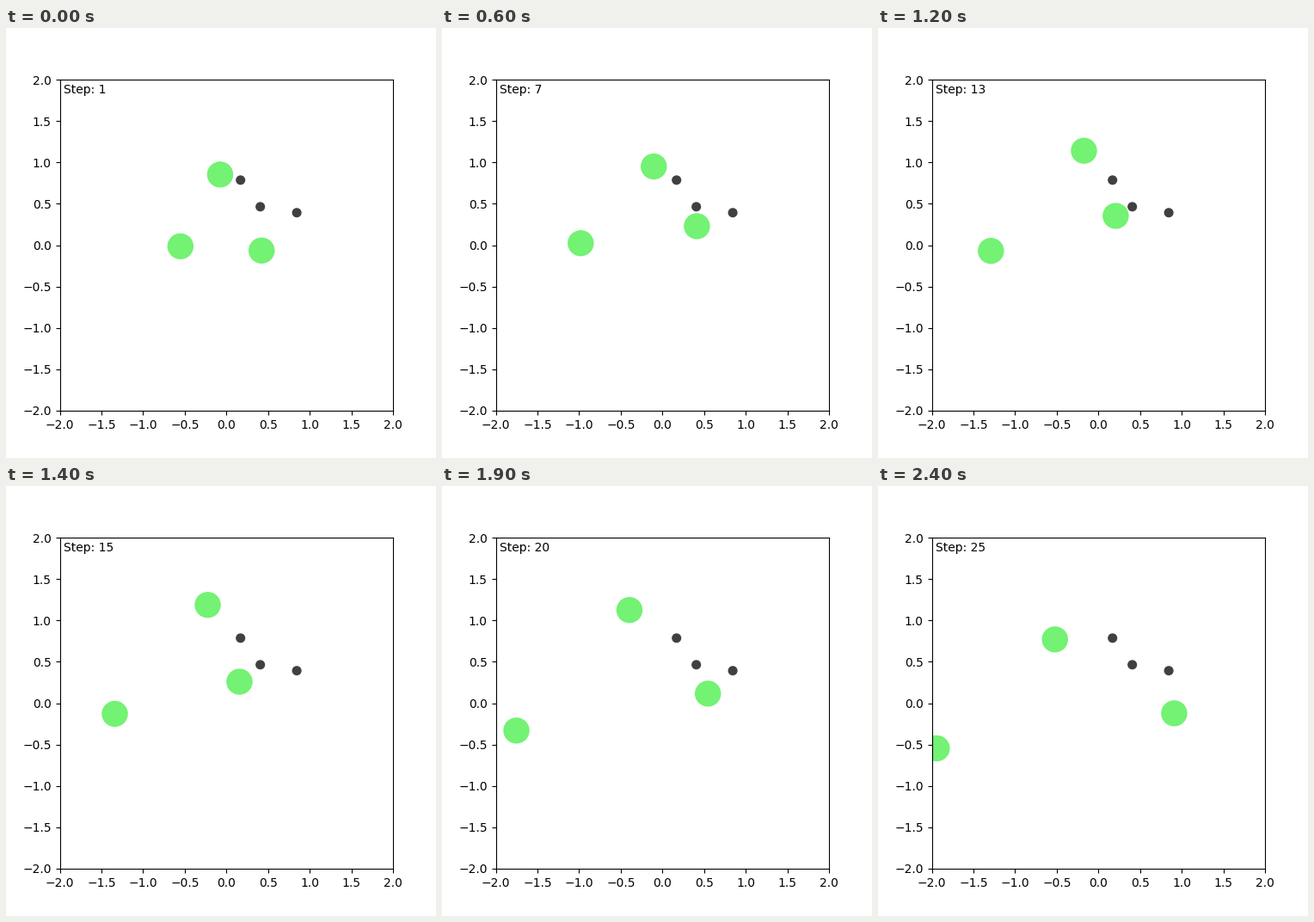
A matplotlib script that plays this animation: 500 px wide and 500 px high, repeating every 2500 ms.

```python
import numpy as np
import matplotlib.pyplot as plt
from matplotlib.animation import FuncAnimation
from matplotlib.patches import Circle

STEPS = 25
KEY_GAP = 5
INTERVAL = 100
LIMIT = 2
GREEN = (0.45, 0.95, 0.45)
GREY = (0.25, 0.25, 0.25)

LANDMARKS = [(0.170, 0.786), (0.407, 0.464), (0.845, 0.392)]

# Where each agent stands every KEY_GAP steps
ROUTES = [
    [(-0.069, 0.842), (-0.098, 0.904), (-0.119, 1.035),
     (-0.224, 1.187), (-0.395, 1.125), (-0.521, 0.770)],
    [(-0.491, -0.025), (-0.801, 0.025), (-1.232, -0.005),
     (-1.339, -0.129), (-1.752, -0.331), (-1.940, -0.546)],
    [(0.422, -0.095), (0.423, 0.071), (0.373, 0.436),
     (0.157, 0.259), (0.547, 0.115), (0.910, -0.123)],
]


def glide(keys, step):
    """Position on a smooth Hermite curve through evenly timed keys."""
    keys = np.array(keys)
    vel = np.gradient(keys, axis=0)
    u = step / KEY_GAP
    i = min(int(u), len(keys) - 2)
    s = u - i
    ease = s * s * (3 - 2 * s)
    return (keys[i] + ease * (keys[i + 1] - keys[i])
            + s * (1 - s) ** 2 * vel[i]
            - s * s * (1 - s) * vel[i + 1])


fig, ax = plt.subplots(figsize=(5, 5), dpi=100)
ax.set(xlim=(-LIMIT, LIMIT), ylim=(-LIMIT, LIMIT))
ticks = np.arange(-LIMIT, LIMIT + 0.5, 0.5)
ax.set_xticks(ticks)
ax.set_yticks(ticks)

agents = [ax.add_patch(Circle(keys[0], 0.15, color=GREEN)) for keys in ROUTES]
for center in LANDMARKS:
    ax.add_patch(Circle(center, 0.05, color=GREY))
label = ax.text(-1.95, 1.95, "", va="top", fontsize=10)


def update(index):
    step = index + 1
    for agent, keys in zip(agents, ROUTES):
        agent.center = glide(keys, step)
    label.set_text(f"Step: {step}")
    return [*agents, label]


anim = FuncAnimation(fig, update, frames=STEPS, interval=INTERVAL,
                     repeat=True, repeat_delay=0)
plt.show()
```
